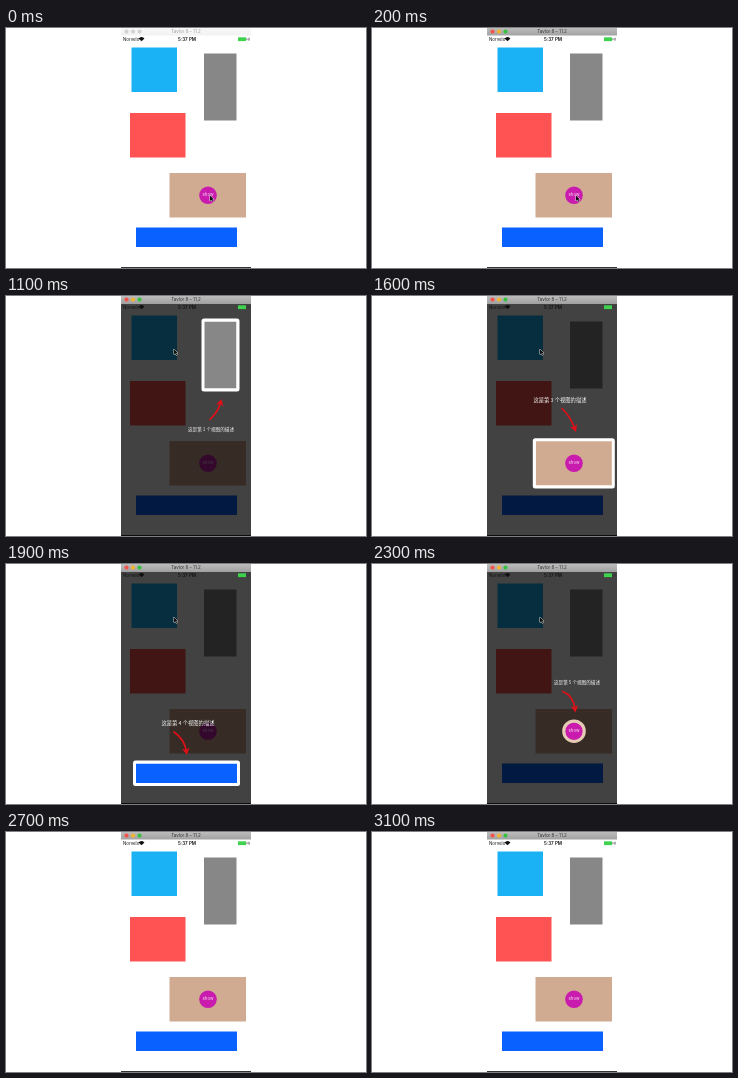
An HTML page with a canvas that plays this animation: 360x240 px, repeating every 3200 ms.

```html
<!DOCTYPE html>
<html lang="zh">
<head>
<meta charset="utf-8">
<style>
html, body { margin: 0; width: 100%; height: 100%; overflow: hidden; background: #fff; }
canvas { display: block; }
</style>
</head>
<body>
<canvas id="stage" width="360" height="240"></canvas>
<script>
const c = document.getElementById('stage').getContext('2d');
const LOOP = 3200, SHOW = 300, HIDE = 2400;
const LATIN = 'Inter, Roboto, sans-serif';
const CJK = '"Noto Sans CJK SC", "Noto Sans CJK", sans-serif';

// x, y, width, height, colour
const views = [
  [125.5, 19.5, 45.5, 44.5, '#1bb1f5'],
  [198, 25.5, 32.5, 67, '#878787'],
  [124, 85, 55.5, 44.5, '#ff5353'],
  [163.5, 145, 76.5, 44.5, '#d0aa91'],
  [130, 199.5, 101, 19.5, '#0962ff']
];
const button = { x: 202, y: 167.2, r: 8.8 };

// cut = x, y, w, h, corner radius; arrow = tail, control, tip
const steps = [
  { at: 300, cut: [124.5, 18, 48, 47.5, 1], text: [160.5, 106], size: 5.3, color: '#d81822',
    arrow: [161, 95, 150, 91, 148, 73.5] },
  { at: 900, cut: [197, 24, 35, 70, 1], text: [205, 133.5], size: 4.6,
    arrow: [204, 123.5, 212, 116, 215.5, 103] },
  { at: 1200, cut: [122.5, 83.5, 58.5, 47.5, 1], text: [163, 170], size: 5.3,
    arrow: [164, 160, 153, 155, 151.5, 139] },
  { at: 1500, cut: [162.3, 143.7, 79, 47.2, 1], text: [188, 104], size: 5.3,
    arrow: [190, 112.5, 198, 120, 204, 136] },
  { at: 1800, cut: [128.5, 198, 104, 22.5, 1], text: [182, 159], size: 5.3,
    arrow: [168, 168, 178, 175, 181, 191] },
  { at: 2100, cut: [191.7, 156.9, 20.6, 20.6, 10.3], text: [205, 117.8], size: 4.6, rim: '#e5cbb5',
    arrow: [191, 127.5, 201, 132, 203.5, 148.5] }
];

const clamp = v => Math.max(0, Math.min(1, v));
const ease = v => { v = clamp(v); return v * v * (3 - 2 * v); };
const mix = (a, b, k) => a + (b - a) * k;

function label(text, x, y, size, color, align = 'center', weight = 400, family = LATIN) {
  c.font = `${weight} ${size}px ${family}`;
  c.fillStyle = color;
  c.textAlign = align;
  c.textBaseline = 'middle';
  c.fillText(text, x, y);
}

function disc(x, y, r, color) {
  c.fillStyle = color;
  c.beginPath();
  c.arc(x, y, r, 0, Math.PI * 2);
  c.fill();
}

function drawViews() {
  c.fillStyle = '#fff';
  c.fillRect(115, 7.5, 130, 232.5);
  for (const [x, y, w, h, color] of views) {
    c.fillStyle = color;
    c.fillRect(x, y, w, h);
  }
  disc(button.x, button.y, button.r, '#c91cae');
  label('show', button.x, button.y, 4.3, '#f7dff2');
  c.fillStyle = '#333';
  c.fillRect(115, 239, 130, 1);
}

function drawTitleBar(active) {
  const shade = c.createLinearGradient(0, 0, 0, 7.5);
  shade.addColorStop(0, active ? '#bcbcbc' : '#f8f8f8');
  shade.addColorStop(1, active ? '#a2a2a2' : '#f2f2f2');
  c.fillStyle = shade;
  c.fillRect(115, 0, 130, 7.5);
  const lights = active ? ['#f4544d', '#f3b32f', '#35c23f'] : ['#d2d2d2', '#d2d2d2', '#d2d2d2'];
  lights.forEach((color, i) => disc(120.5 + i * 6.5, 3.6, 2.1, color));
  label('Tavlor 8 – 11.2', 180, 3.8, 4.5, active ? '#333' : '#a0a0a0');
}

function drawStatusBar() {
  label('Norvelo', 117, 11.3, 4.4, '#111', 'left');
  label('5:37 PM', 181, 11.3, 4.6, '#111', 'center', 600);
  c.fillStyle = '#111';
  c.beginPath();
  c.moveTo(135.5, 13.2);
  c.arc(135.5, 13.2, 4, -Math.PI * 0.77, -Math.PI * 0.23);
  c.fill();
  c.fillStyle = '#3ed34d';
  c.fillRect(232, 9.3, 8, 3.8);
  c.fillStyle = '#333';
  c.fillRect(240.6, 10.3, 0.7, 1.8);
  c.fillRect(242.6, 9.8, 0.8, 2.8);
}

function drawArrow([x0, y0, cx, cy, x1, y1]) {
  const angle = Math.atan2(y1 - cy, x1 - cx);
  const bx = x1 - 5 * Math.cos(angle), by = y1 - 5 * Math.sin(angle);
  c.strokeStyle = c.fillStyle = '#df1019';
  c.lineWidth = 1.7;
  c.lineCap = 'round';
  c.beginPath();
  c.moveTo(x0, y0);
  c.quadraticCurveTo(cx, cy, bx, by);
  c.stroke();
  c.save();
  c.translate(x1, y1);
  c.rotate(angle);
  c.beginPath();
  c.moveTo(0, 0);
  c.lineTo(-7, -3.8);
  c.lineTo(-5, 0);
  c.lineTo(-7, 3.8);
  c.fill();
  c.restore();
}

function drawGuide(t) {
  const opacity = ease((t - SHOW + 100) / 200) * (1 - ease((t - HIDE) / 200));
  if (!opacity) return;
  const index = Math.max(0, steps.findLastIndex(s => s.at <= t));
  const step = steps[index], last = steps[Math.max(0, index - 1)];
  const k = ease((t - step.at + 50) / 150);
  const [x, y, w, h, r] = step.cut.map((v, i) => mix(last.cut[i], v, k));

  c.save();
  c.globalAlpha = opacity;
  c.fillStyle = 'rgba(0,0,0,.74)';
  c.beginPath();
  c.rect(115, 7.5, 130, 232.5);
  c.roundRect(x, y, w, h, r);
  c.fill('evenodd');
  c.strokeStyle = step.rim || '#fff';
  c.lineWidth = 3;
  c.beginPath();
  c.roundRect(x, y, w, h, r);
  c.stroke();
  drawArrow(step.arrow);
  label(`这是第 ${index} 个视图的描述`, ...step.text, step.size, step.color || '#f4f4f4', 'center', 400, CJK);
  c.restore();
}

function drawCursor(t) {
  if (t >= 2500) return;
  const a = ease((t - 300) / 400), b = ease((t - 700) / 300);
  c.save();
  c.translate(mix(mix(204, 192, a), 168, b), mix(mix(167.5, 88.5, a), 53, b));
  c.beginPath();
  [[0, 0], [0, 5.4], [1.3, 4.3], [2.2, 6.2], [3.1, 5.8], [2.3, 4], [3.9, 3.9]]
    .forEach(p => c.lineTo(...p));
  c.closePath();
  c.strokeStyle = '#eee';
  c.lineWidth = 0.9;
  c.stroke();
  c.fillStyle = '#111';
  c.fill();
  c.restore();
}

function frame(now) {
  const t = Math.floor(now % LOOP / 100) * 100;
  c.fillStyle = '#fff';
  c.fillRect(0, 0, 360, 240);
  drawViews();
  drawGuide(t);
  drawStatusBar();
  drawTitleBar(t >= 200);
  drawCursor(t);
  requestAnimationFrame(frame);
}
frame(0);
</script>
</body>
</html>
```
